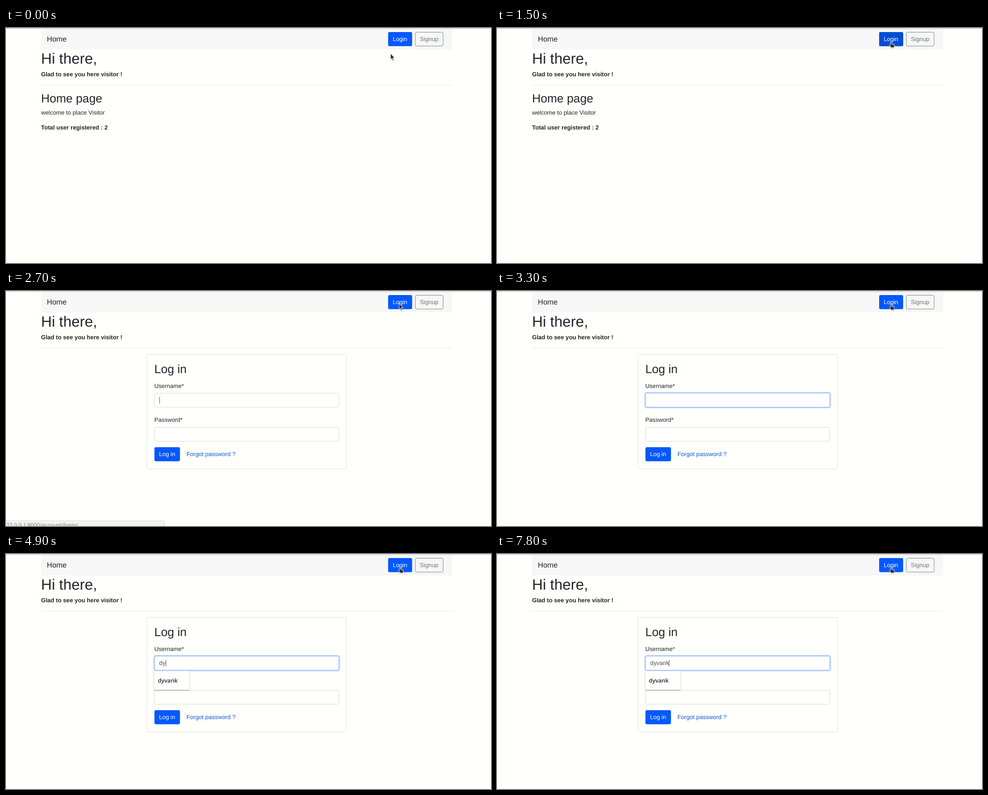
Write an HTML page that moves like this. It is 1075 px wide and 521 px high and loops after 8 s.

```html
<!DOCTYPE html>
<html lang="en">
<head>
<meta charset="utf-8">
<title>Log in</title>
<style>
  html, body { margin: 0; width: 100%; height: 100%; overflow: hidden; background: #fffffb; }
  svg { display: block; width: 1075px; height: 521px; }
  text {
    font: 13.13px "Liberation Sans", Arial, sans-serif;
    fill: #212529;
    text-rendering: geometricPrecision;
    white-space: pre;
  }
  .h1 { font-size: 32.83px; }
  .h2 { font-size: 26.26px; }
  .brand { font-size: 16.41px; }
  .bold { font-weight: bold; }
  .mid { text-anchor: middle; }
  .light { fill: #fffffb; }
  .grey { fill: #6c757d; }
  .link { fill: #0a58dc; }
  .primary { fill: #0558fc; }
  .field { fill: #fffffd; stroke: #ced4da; stroke-width: .9; }
  .value { fill: #495057; font-kerning: none; letter-spacing: .1px; }
  .popup rect { fill: #fffffd; filter: drop-shadow(0 1px 1.3px rgba(0, 0, 0, .42)); }
  .popup text { font: 600 12.6px "Open Sans", "Noto Sans", sans-serif; }
  .status rect { fill: #f2f4f2; stroke: #d5d8d5; stroke-width: .9; }
  .status text { font: 12px "Open Sans", "Noto Sans", sans-serif; fill: #74777a; text-anchor: end; }
  .arrow path, .hand path { stroke: #fffffb; stroke-width: 1; stroke-linejoin: round; }
  .arrow, .hand { filter: drop-shadow(0 1px 1px rgba(0, 0, 0, .3)); }

  /* 1% of the loop is 80 ms */
  .home, .login, .hover, .ring, .status, .glow, .list, .match, .squiggle, .arrow, .hand, .caret, .typed {
    animation: 8s step-end infinite;
  }
  .home { animation-name: home; }
  .login { animation-name: login; }
  .hover { animation-name: hover; }
  .ring { animation-name: ring; }
  .status { animation-name: status; }
  .glow { animation-name: glow; }
  .list { animation-name: list; }
  .match { animation-name: match; }
  .squiggle { animation-name: squiggle; }
  .arrow { animation-name: arrow; }
  .hand { animation-name: hand; }
  .caret { animation-name: caret; }
  .typed { animation-name: typed; }

  @keyframes home { 0% { opacity: 1 } 33.75%, 100% { opacity: 0 } }
  @keyframes login { 0% { opacity: 0 } 33.75%, 100% { opacity: 1 } }
  @keyframes hover { 0% { opacity: 0 } 17.5% { opacity: .5 } 18.75% { opacity: 1 } 33.75%, 100% { opacity: 0 } }
  @keyframes ring { 0% { opacity: 0 } 28.75% { opacity: .1 } 30% { opacity: .65 } 31.25% { opacity: 1 } 33.75%, 100% { opacity: 0 } }
  @keyframes status { 0% { opacity: 0 } 20% { opacity: .5 } 21.25% { opacity: 1 } 36.25%, 100% { opacity: 0 } }
  @keyframes glow { 0% { opacity: 0 } 35% { opacity: .6 } 36.25%, 100% { opacity: 1 } }
  @keyframes list { 0% { opacity: 0 } 58.75% { opacity: 1 } 61.25%, 100% { opacity: 0 } }
  @keyframes match { 0% { opacity: 0 } 61.25%, 100% { opacity: 1 } }
  @keyframes squiggle { 0% { opacity: 0 } 75% { opacity: 1 } 93.75%, 100% { opacity: 0 } }
  @keyframes arrow {
    0% { opacity: 1; transform: translate(852px, 56px) }
    2.5% { opacity: 1; transform: translate(863px, 52px) }
    13.75% { opacity: 1; transform: translate(869px, 46px) }
    15% { opacity: 1; transform: translate(875px, 40px) }
    17.5% { opacity: 0; transform: translate(871px, 27px) }
    33.75% { opacity: 1; transform: translate(871px, 27px) }
    35%, 100% { opacity: 0; transform: translate(871px, 27px) }
  }
  @keyframes hand {
    0% { opacity: 0; transform: translate(869px, 28px) }
    17.5% { opacity: 1; transform: translate(870px, 31px) }
    18.75% { opacity: 1; transform: translate(869px, 29px) }
    20% { opacity: 1; transform: translate(869px, 27.5px) }
    33.75% { opacity: 0; transform: translate(869px, 27.5px) }
    35%, 100% { opacity: 1; transform: translate(869px, 27.5px) }
  }
  @keyframes caret {
    0% { opacity: 0; transform: none }
    33.75% { opacity: 1; transform: none }
    41.25% { opacity: 0; transform: none }
    48.75% { opacity: 1; transform: none }
    56.25% { opacity: 0; transform: none }
    58.75% { opacity: 1; transform: translateX(7px) }
    61.25% { opacity: 1; transform: translateX(14px) }
    62.5% { opacity: 1; transform: translateX(20px) }
    70% { opacity: 0; transform: translateX(20px) }
    77.5% { opacity: 1; transform: translateX(20px) }
    85% { opacity: 0; transform: translateX(20px) }
    92.5% { opacity: 1; transform: translateX(20px) }
    93.75% { opacity: 1; transform: translateX(27px) }
    95% { opacity: 1; transform: translateX(35px) }
    97.5%, 100% { opacity: 1; transform: translateX(41px) }
  }
  @keyframes typed {
    0% { width: 0px }
    58.75% { width: 7.4px }
    61.25% { width: 14.1px }
    62.5% { width: 20.7px }
    93.75% { width: 28.1px }
    95% { width: 35.5px }
    97.5%, 100% { width: 46px }
  }
</style>
</head>
<body>
<svg viewBox="0 0 1075 521">
  <defs>
    <clipPath id="typed"><rect class="typed" x="339.5" y="230" height="25"/></clipPath>
  </defs>

  <rect width="1075" height="1" fill="#e9eae9"/>
  <rect y="1" width="1075" height="1" fill="#cbcccb"/>
  <rect x="78" y="2" width="911" height="45.5" fill="#f6f7f6"/>
  <text class="brand" x="90.6" y="30">Home</text>

  <rect class="ring" x="844.3" y="6.3" width="58.6" height="36.6" rx="5" fill="#8db6fb"/>
  <rect class="primary" x="847" y="9" width="53.2" height="31.2" rx="3.3"/>
  <rect class="hover" x="847" y="9" width="53.2" height="31.2" rx="3.3" fill="#034dd4"/>
  <text class="mid light" x="873.2" y="28.6">Login</text>
  <rect x="907.3" y="9.4" width="61.6" height="30.6" rx="3.3" fill="none" stroke="#6c757d" stroke-width=".9"/>
  <text class="mid grey" x="937.8" y="28.6">Signup</text>

  <text class="h1" x="77.7" y="78.8">Hi there,</text>
  <text class="bold" x="77.7" y="107.3">Glad to see you here visitor !</text>
  <rect x="78" y="126.2" width="911" height=".9" fill="#000" opacity=".11"/>

  <g class="home">
    <text class="h2" x="77.7" y="165">Home page</text>
    <text x="77.7" y="192">welcome to place Visitor</text>
    <text class="bold" x="77.7" y="224.8">Total user registered : 2</text>
  </g>

  <g class="login">
    <rect x="312.4" y="140.5" width="442.2" height="254" rx="3.3" fill="none" stroke="#000" stroke-opacity=".14" stroke-width=".9"/>
    <text class="h2" x="328.8" y="182.2">Log in</text>
    <text x="328.8" y="214.7">Username*</text>
    <rect class="field" x="329.3" y="226.5" width="408.4" height="31" rx="3"/>
    <g class="glow">
      <rect x="328" y="225.2" width="411" height="33.6" rx="4" fill="none" stroke="#bfd4fd" stroke-width="2.6"/>
      <rect class="field" x="329.3" y="226.5" width="408.4" height="31" rx="3" style="stroke:#86b2fb"/>
    </g>
    <text x="328.8" y="290.3">Password*</text>
    <rect class="field" x="329.3" y="302.3" width="408.4" height="30.6" rx="3"/>
    <rect class="primary" x="329" y="346.2" width="56.6" height="31.2" rx="3.3"/>
    <text class="mid light" x="357.2" y="366">Log in</text>
    <text class="link" x="400" y="366">Forgot password ?</text>

    <text class="value" x="339.5" y="246.2" clip-path="url(#typed)">dyvank</text>
    <path class="squiggle" d="M340 248.6l1.5-1.4 1.5 1.4 1.5-1.4 1.5 1.4 1.5-1.4 1.5 1.4 1.5-1.4 1.5 1.4 1.5-1.4 1.5 1.4 1.5-1.4 1.5 1.4 1.5-1.4" fill="none" stroke="#e0504c" stroke-width=".8"/>
    <rect class="caret" x="340" y="235" width="1" height="14.4" fill="#495057"/>

    <g class="popup list">
      <rect x="328.3" y="259.4" width="106" height="130.8"/>
      <text x="336.5" y="284.6">dyvank</text>
      <text x="336.5" y="314.1">demo</text>
      <text x="336.5" y="343.7">demouser12</text>
      <text x="336.5" y="373.2">dtest</text>
    </g>
    <g class="popup match">
      <rect x="328.3" y="259.4" width="78.6" height="41.8"/>
      <text x="336.5" y="284.6">dyvank</text>
    </g>
  </g>

  <g class="status">
    <rect x="-5" y="509.4" width="356" height="20" rx="3"/>
    <text x="160" y="522.6">127.0.0.1:8000/account/login/</text>
  </g>

  <g class="arrow">
    <path d="M.4.5V13.6L3.2 11l2.2 5 2.1-.9-2.2-4.8h3.9z" fill="#222"/>
  </g>
  <g class="hand">
    <path d="M4 1.2q1.3 0 1.3 1.3V6l5.4 1.1q1.4.4 1.2 1.9l-.9 5.4H5.2L1 10q-.5-1.4 1-1.5l.8.6V2.5Q2.8 1.2 4 1.2z" fill="#2a2a2a"/>
    <path d="M7.4 7v2M9.5 7.4v1.8" fill="none" style="stroke-width:.5"/>
  </g>
</svg>
</body>
</html>
```
